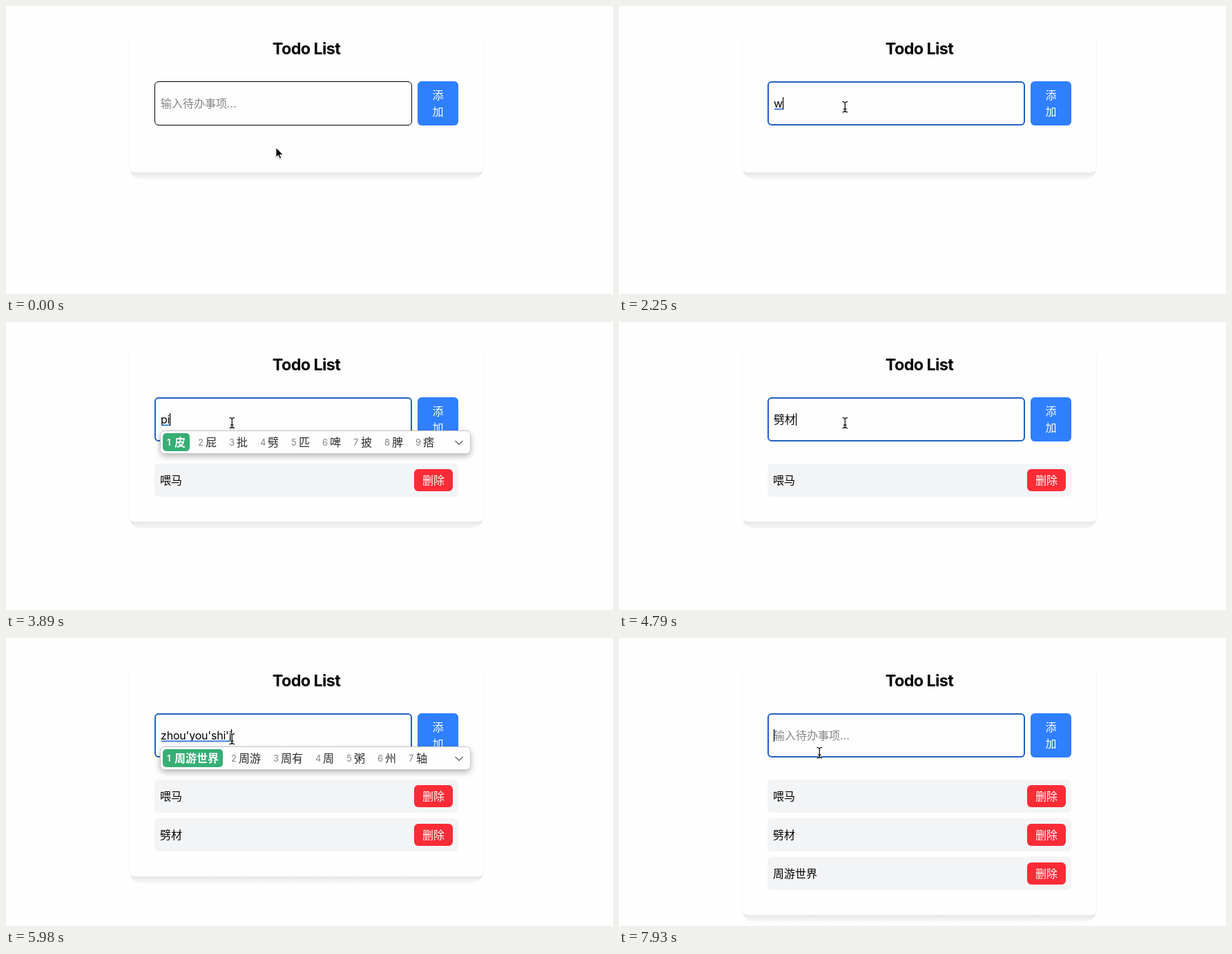
Animation of 879x417 px, one loop 8 s. Source, as an HTML page:

```html
<!DOCTYPE html>
<html lang="zh-CN">
<head>
<meta charset="utf-8">
<title>Todo List</title>
<style>
html, body { margin: 0; width: 100%; height: 100%; overflow: hidden; background: #fefefe; }
svg { display: block; }
text { font: 16px Inter, "Noto Sans CJK SC", "Noto Sans CJK", sans-serif; white-space: pre; }
#title { font-weight: 700; font-size: 23.4px; letter-spacing: -.6px; }
#typed { letter-spacing: -.2px; }
.mid { text-anchor: middle; }
.btn { fill: #fff; font-weight: 500; }
.num { font-size: 13px; fill: #858585; }
.word { fill: #2b2b2b; }
.pick { fill: #fff; font-weight: 600; }
.beam { fill: none; stroke-linecap: round; }
</style>
</head>
<body>
<svg width="879" height="417" viewBox="0 0 879 417">
  <defs>
    <linearGradient id="fade" x1="0" y1="0" x2="0" y2="10" gradientUnits="userSpaceOnUse">
      <stop offset="0" stop-color="#e4e4e4"/>
      <stop offset=".5" stop-color="#f1f1f1"/>
      <stop offset="1" stop-color="#f6f6f6"/>
    </linearGradient>
    <filter id="soft" x="-10%" y="-60%" width="120%" height="260%">
      <feDropShadow dx="0" dy="3.5" stdDeviation="4" flood-color="#000" flood-opacity=".27"/>
    </filter>
    <filter id="drop" x="-50%" y="-50%" width="200%" height="200%">
      <feDropShadow dx="0" dy="1" stdDeviation=".8" flood-color="#000" flood-opacity=".3"/>
    </filter>
    <clipPath id="below"><rect y="44" width="879" height="373"/></clipPath>
  </defs>

  <g clip-path="url(#below)">
    <path id="shade" fill="url(#fade)" d="M179 -6C180 5 187 9.5 198 9.5H672C683 9.5 690 5 691 -6Z"/>
    <rect id="card" x="178.5" y="20" width="513" rx="7" fill="#fefefe" stroke="#f5f5f5"/>
  </g>

  <text id="title" class="mid" x="435" y="70">Todo List</text>
  <rect id="box" fill="#fefefe"/>
  <rect x="596" y="109" width="59" height="64" rx="6" fill="#2f7fff"/>
  <text class="mid btn" x="625.5" y="135">添</text>
  <text class="mid btn" x="625.5" y="159">加</text>

  <g id="items"></g>

  <text id="hint" x="224" y="147" fill="#858585">输入待办事项...</text>
  <text id="typed" x="224" y="147"></text>
  <rect id="line" x="225" y="148.5" height="1.8" fill="#2f74e0"/>
  <rect id="caret" y="132" width="1.2" height="18"/>

  <g id="popup">
    <rect x="223.5" y="157.5" width="449" height="33" rx="6" fill="#fefefe" stroke="#c6c6c6" filter="url(#soft)"/>
    <g id="words"></g>
    <path d="M650.5 172L656 177.3L661.5 172" fill="none" stroke="#666" stroke-width="1.3"/>
  </g>

  <path id="arrow" d="M0 0V14.2L3.3 11.2L5.5 16.2L7.8 15.2L5.6 10.3H10.2Z" stroke="#fff" stroke-width="1" filter="url(#drop)"/>
  <g id="beam" class="beam">
    <path id="bar" d="M-3 -7.3Q0 -7.3 .3 -5.3Q.6 -7.3 3.6 -7.3M.3 -5.3V5.7M-3 7.7Q0 7.7 .3 5.7Q.6 7.7 3.6 7.7M-1.5 3.2H2.1" stroke="#fff" stroke-width="2.6"/>
    <use href="#bar"/>
  </g>
</svg>
<script>
const LOOP = 8000;
const $ = id => document.getElementById(id);

// [start ms, typed text, candidates]; no candidates hides the popup
const typing = [
  [0, ""],
  [2250, "w"],
  [2390, "we", "我 为 位 问 未 微 喂 味 文"],
  [2540, "wei", "为 位 未 喂 微 味 围 委 威"],
  [2690, "wei'm", "微妙 微米 未满 为嘛 威猛 为名"],
  [2840, "wei'ma", "喂马 为嘛 位吗 威马 微码 魏玛"],
  [3140, "喂马"],
  [3440, ""],
  [3740, "p"],
  [3890, "pi", "皮 屁 批 劈 匹 啤 披 脾 痞"],
  [4040, "pi'c", "批次 匹配 皮草 劈柴 皮层 批"],
  [4340, "pi'cai", "劈材 劈柴 皮材 批 皮 屁 匹"],
  [4790, "劈材"],
  [4940, ""],
  [5240, "zh", "中 🀄 这 之后 综合 最好 找"],
  [5390, "zhou", "周 州 粥 轴 洲 皱 宙 舟 咒"],
  [5540, "zhou'y", "周一 周游 周有 周 州 粥 轴"],
  [5690, "zhou'you", "周游 周有 周 粥 州 轴 洲"],
  [5830, "zhou'you'shi", "周游时 周游 周有 周 粥 州 轴"],
  [5980, "zhou'you'shi'j", "周游世界 周游 周有 周 粥 州 轴"],
  [6130, "zhou'you'shi'ji", "周游世纪 周游 周有 周 粥 州 轴"],
  [6280, "zhou'you'shi'jie", "周游世界 周游 周有 周 粥 州 轴"],
  [6730, "周游世界"],
  [7180, ""]
];
const todos = [[3440, "喂马"], [4940, "劈材"], [7180, "周游世界"]];

// [start ms, x, y]
const pointer = [
  [0, 391, 205], [1350, 373, 189], [1500, 341, 160], [1650, 327, 146],
  [7780, 307, 157], [7930, 290, 166]
];
const FOCUS = 1800;
const blinkOff = t => t >= 7330 && t < 7930;

const latest = (list, t) => list.filter(s => s[0] <= t).pop();
const label = (x, y, s, cls = "") => `<text x="${x}" y="${y}" class="${cls}">${s}</text>`;
const block = (x, y, w, h, r, fill) =>
  `<rect x="${x}" y="${y}" width="${w}" height="${h}" rx="${r}" fill="${fill}"/>`;
const set = (el, attrs) => { for (const k in attrs) el.setAttribute(k, attrs[k]); };
const show = (el, on) => { el.style.display = on ? "" : "none"; };

function todo([, name], i) {
  const y = 205 + 56 * i;
  return block(215, y, 440, 48, 6, "#f3f4f6") + label(223, y + 30, name) +
    block(591, y + 8, 56, 32, 6, "#fb2c36") + label(603, y + 30, "删除", "btn");
}

function tile(x) {
  return block(x, 164, 16, 20, 2, "#b98a58") + block(x, 164, 16, 18, 2, "#e2d3bb") +
    `<text x="${x + 8}" y="178" class="mid" style="font-size:13px;font-weight:700" fill="#b52a2a">中</text>`;
}

function candidates(list) {
  let x = 233, out = "";
  list.split(" ").forEach((word, i) => {
    const isTile = word === "🀄";
    const w = isTile ? 23 : 16 * word.length;
    if (!i) out += block(227, 161, 23 + w, 26, 5, "#36ae74");
    out += label(x, 179, i + 1, i ? "num" : "num pick");
    out += isTile ? tile(x + 14) : label(x + 11, 180, word, i ? "word" : "pick");
    x += 11 + w + 18;
  });
  return out;
}

function draw(t) {
  const [, text, list] = latest(typing, t);
  const done = todos.filter(s => s[0] <= t);
  const focused = t >= FOCUS;
  const bottom = done.length ? 233 + 56 * done.length : 241;

  set($("card"), { height: bottom - 20 });
  set($("shade"), { transform: `translate(0 ${bottom})` });
  $("items").innerHTML = done.map(todo).join("");

  set($("box"), focused
    ? { x: 216, y: 110, width: 371, height: 62, rx: 5, stroke: "#2160c4", "stroke-width": 2 }
    : { x: 215.5, y: 109.5, width: 372, height: 63, rx: 5.5, stroke: "#000", "stroke-width": 1 });

  show($("hint"), !text);
  $("typed").textContent = text;
  const width = text ? $("typed").getComputedTextLength() : 0;
  const composing = /^[a-z']+$/.test(text);
  show($("line"), composing);
  set($("line"), { width: Math.max(0, width - 1) });
  show($("caret"), focused && !blinkOff(t));
  set($("caret"), { x: 224 + Math.round(width) });

  show($("popup"), list);
  $("words").innerHTML = list ? candidates(list) : "";

  const [, px, py] = latest(pointer, t);
  const overInput = py < 173;
  show($("arrow"), !overInput);
  show($("beam"), overInput);
  set($(overInput ? "beam" : "arrow"), { transform: `translate(${px} ${py})` });
}

// a second, thinner stroke puts the dark beam over its light halo
const dark = $("bar").cloneNode();
dark.removeAttribute("id");
set(dark, { stroke: "#000", "stroke-width": 1.2 });
$("beam").replaceChild(dark, $("beam").querySelector("use"));

const start = performance.now();
function tick() {
  draw((performance.now() - start) % LOOP);
  requestAnimationFrame(tick);
}
tick();
</script>
</body>
</html>
```
